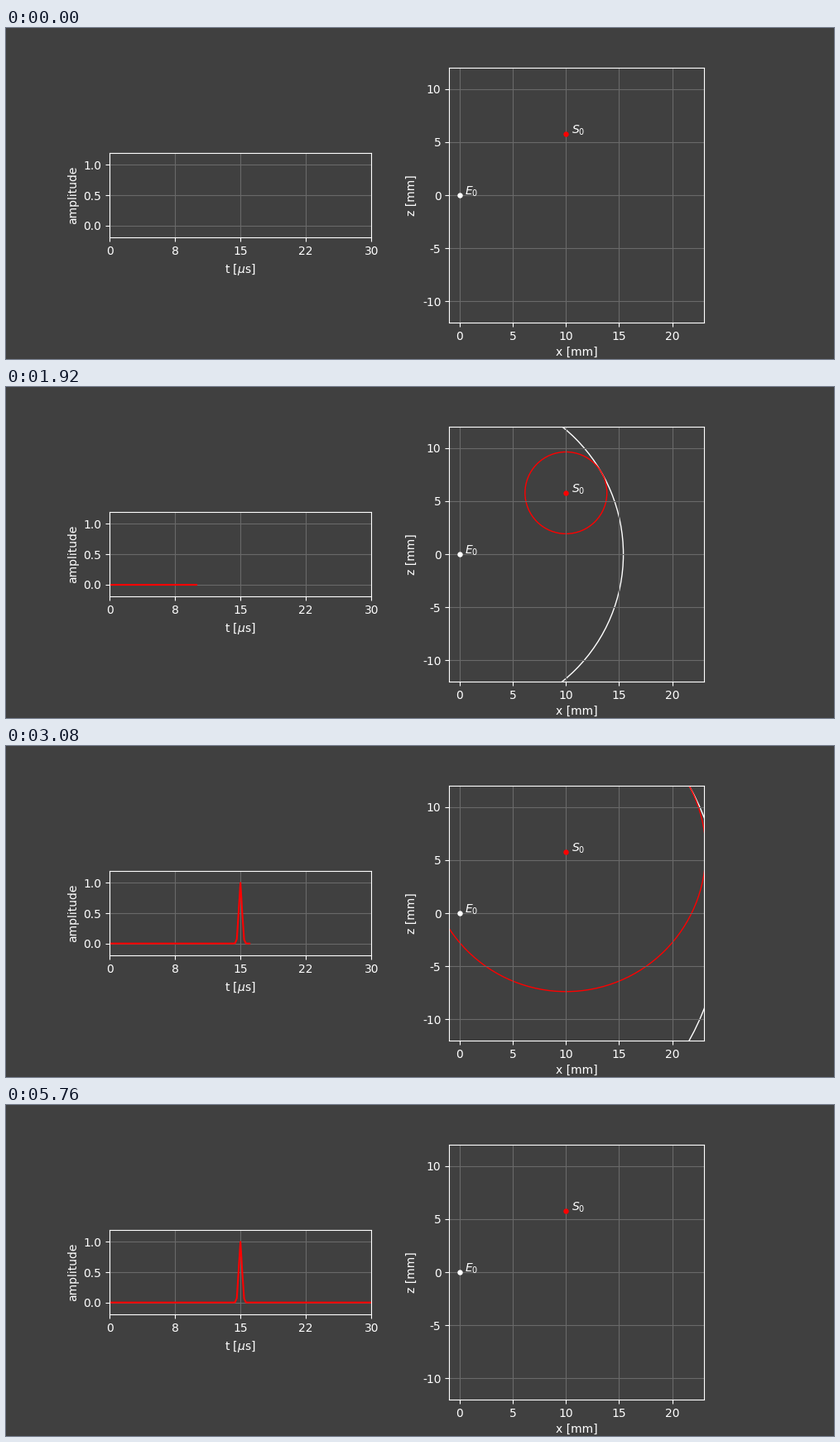
These frames come from a looping animation (1000x400 px, 8 s). A matplotlib script:

```python
import numpy as np
import matplotlib.pyplot as plt
from matplotlib.animation import FuncAnimation

BG, GRID = "#404040", "#696969"
SPEED = 1.54                    # mm per microsecond
T_END, STEPS, FRAMES = 30, 144, 200
EMITTER = np.array([0, 0])
SCATTERER = np.array([10, 10 * np.tan(np.pi / 6)])
DIST = np.hypot(*(SCATTERER - EMITTER))

plt.rcParams.update({
    "font.family": "DejaVu Sans",
    "axes.unicode_minus": False,
    "axes.facecolor": BG,
    "axes.edgecolor": "white",
    "axes.labelcolor": "white",
    "xtick.color": "white",
    "ytick.color": "white",
    "text.color": "white",
    "grid.color": GRID,
    "axes.grid": True,
})

fig = plt.figure(figsize=(10, 4), dpi=100, facecolor=BG)
grid = fig.add_gridspec(3, 2, width_ratios=[3, 4], wspace=0.1, hspace=0)
ax_sig = fig.add_subplot(grid[1, 0])
ax_map = fig.add_subplot(grid[:, 1])

ticks = np.linspace(0, T_END, 5)
ax_sig.set(xlim=(0, T_END), ylim=(-0.2, 1.2), xlabel=r"t [$\mu$s]",
           ylabel="amplitude", yticks=[0, 0.5, 1])
ax_sig.set_xticks(ticks, [f"{t:.0f}" for t in ticks])

ax_map.set(xlim=(-1, 23), ylim=(-12, 12), aspect="equal",
           xlabel="x [mm]", ylabel="z [mm]",
           xticks=range(0, 21, 5), yticks=range(-10, 11, 5))


def add_point(pos, color, label):
    ax_map.plot(*pos, "o", color=color, ms=3.6, zorder=3)
    ax_map.text(pos[0] + 0.5, pos[1], label)


def add_wave(center, color):
    wave = plt.Circle(center, 0, fill=False, ec=color, lw=1)
    return ax_map.add_patch(wave)


add_point(EMITTER, "white", "$E_0$")
add_point(SCATTERER, "red", "$S_0$")
sent = add_wave(EMITTER, "white")
echo = add_wave(SCATTERER, "red")

times = np.linspace(0, T_END, STEPS + 1)
pulse = np.exp(-0.5 * ((times - 2 * DIST / SPEED) / 0.18) ** 2)
trace, = ax_sig.plot([], [], color="red", lw=1.5)


def update(i):
    n = min(i, STEPS)
    reach = SPEED * times[n]
    for wave, radius in ((sent, reach), (echo, reach - DIST)):
        wave.set_radius(max(radius, 0))
        wave.set_visible(radius > 0)
    trace.set_data(times[:n + 1], pulse[:n + 1])
    return sent, echo, trace


anim = FuncAnimation(fig, update, frames=FRAMES, interval=40,
                     repeat=True, repeat_delay=0)
plt.show()
```
